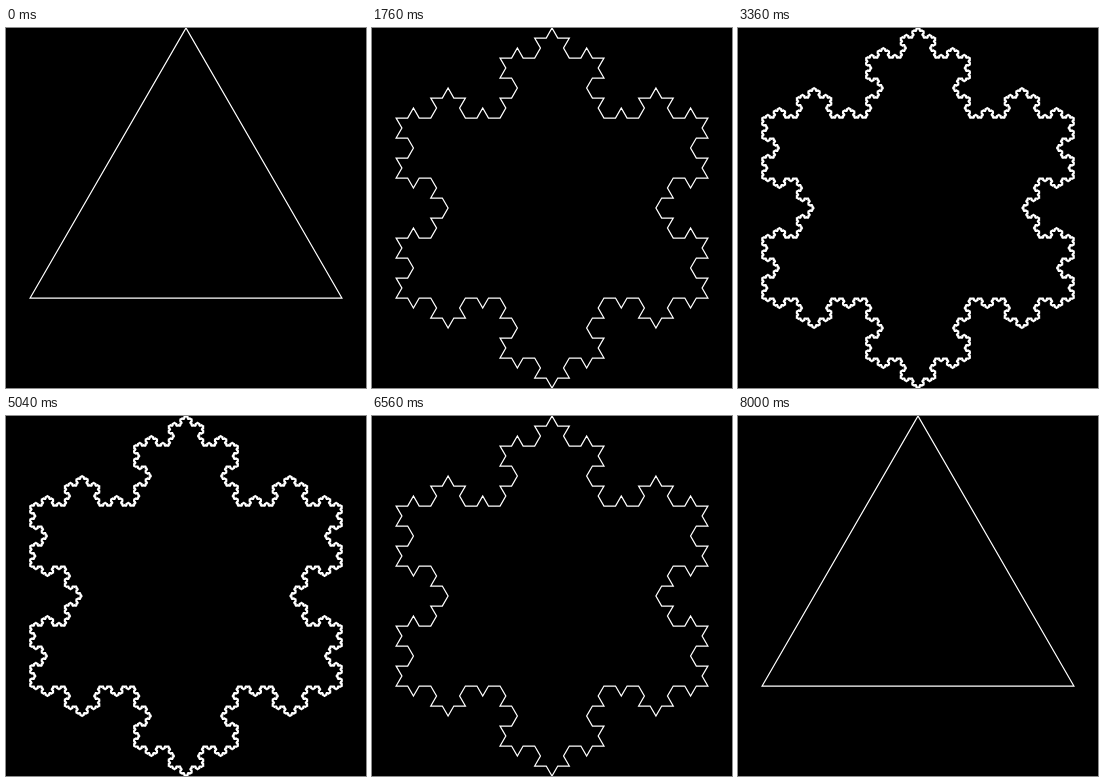
These frames come from a looping animation (360x360 px, 8720 ms). An HTML page with a canvas:

```html
<!DOCTYPE html>
<html lang="en">
<head>
<meta charset="utf-8">
<title>Koch snowflake</title>
<style>
  html, body { margin: 0; width: 100%; height: 100%; overflow: hidden; background: #000; }
  canvas { display: block; width: 360px; height: 360px; }
</style>
</head>
<body>
<canvas id="stage" width="360" height="360"></canvas>
<script>
const SIZE = 360, LOOP = 8720, DEPTH = 7;
const R = SIZE / 2, H = Math.sqrt(3) / 2;

// [start time in ms, recursion level]
const steps = [
  [0, 0], [960, 1], [1280, 2], [1760, 3], [2080, 4], [2480, 5], [2880, 6], [3360, 7],
  [5440, 6], [5760, 5], [6160, 4], [6560, 3], [6960, 2], [7360, 1], [7840, 0]
];

function koch(g, x1, y1, x2, y2, level) {
  if (!level) { g.lineTo(x2, y2); return; }
  const dx = (x2 - x1) / 3, dy = (y2 - y1) / 3;
  const ax = x1 + dx, ay = y1 + dy;
  const bx = x2 - dx, by = y2 - dy;
  const px = ax + dx / 2 + dy * H, py = ay + dy / 2 - dx * H;
  koch(g, x1, y1, ax, ay, level - 1);
  koch(g, ax, ay, px, py, level - 1);
  koch(g, px, py, bx, by, level - 1);
  koch(g, bx, by, x2, y2, level - 1);
}

function snowflake(level) {
  const c = document.createElement('canvas');
  c.width = c.height = SIZE;
  const g = c.getContext('2d');
  g.fillStyle = '#000';
  g.fillRect(0, 0, SIZE, SIZE);
  const corners = [0, 1, 2].map(i => {
    const a = -Math.PI / 2 + i * 2 * Math.PI / 3;
    return [R + R * Math.cos(a), R + R * Math.sin(a)];
  });
  g.beginPath();
  g.moveTo(...corners[0]);
  corners.forEach((p, i) => koch(g, ...p, ...corners[(i + 1) % 3], level));
  g.closePath();
  g.strokeStyle = '#fff';
  g.lineWidth = 1.25;
  g.stroke();
  return c;
}

const flakes = Array.from({ length: DEPTH + 1 }, (_, i) => snowflake(i));
const ctx = document.getElementById('stage').getContext('2d');
const start = performance.now();
let shown = -1;

function draw() {
  const t = Math.max(0, performance.now() - start) % LOOP;
  let level = 0;
  for (const [at, n] of steps) if (t >= at) level = n;
  if (level !== shown) {
    ctx.drawImage(flakes[level], 0, 0);
    shown = level;
  }
  requestAnimationFrame(draw);
}
draw();
</script>
</body>
</html>
```
